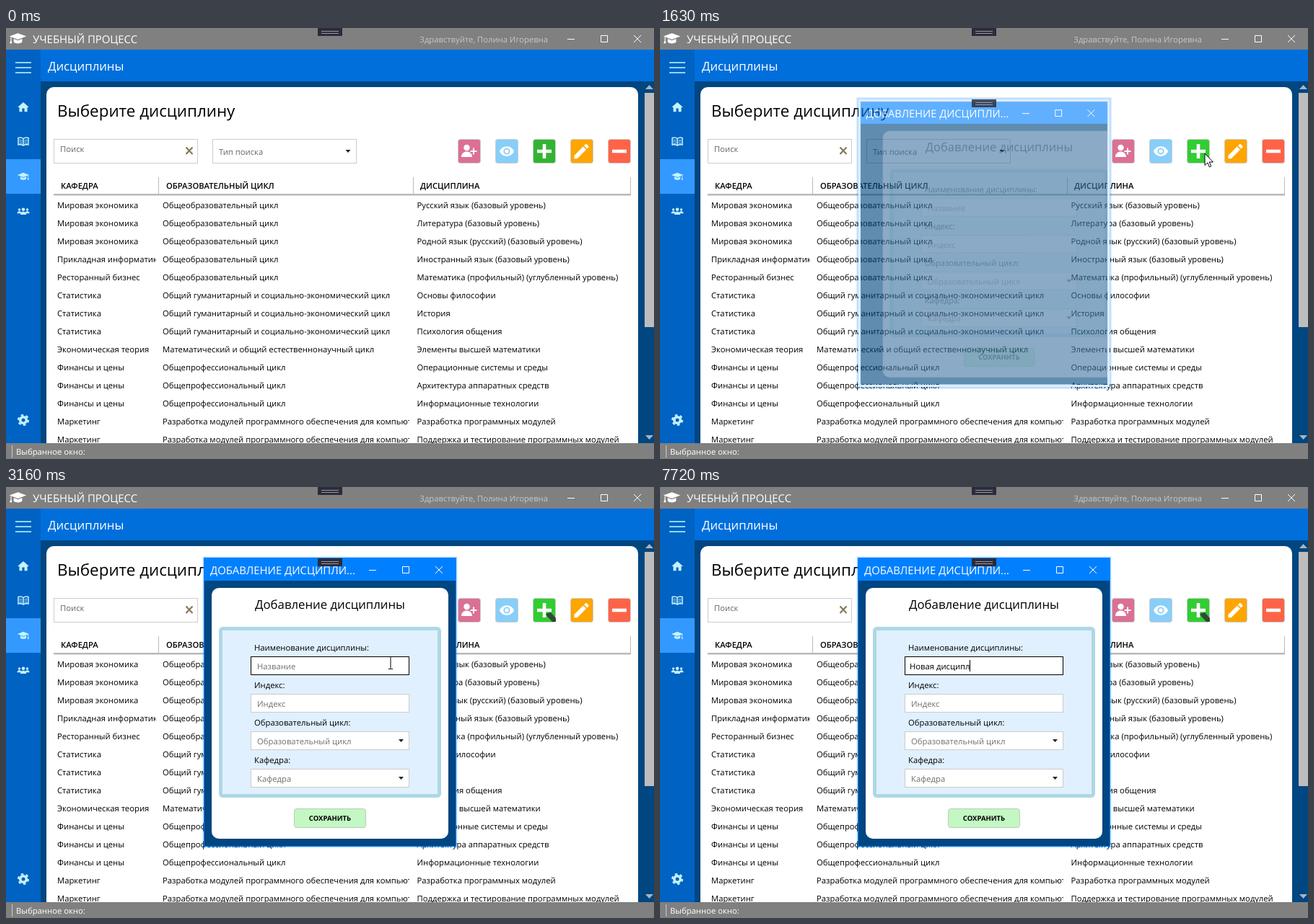
Animation of 898x598 px, one loop 8 s. Source, as an HTML page:

```html
<!DOCTYPE html>
<html lang="ru">
<head>
<meta charset="utf-8">
<title>Учебный процесс</title>
<style>
html, body { margin: 0; width: 100%; height: 100%; overflow: hidden; background: #004680; }
svg { display: block; }
text { font-family: "Open Sans", "Noto Sans", sans-serif; text-rendering: geometricPrecision; white-space: pre; }
</style>
</head>
<body>
<svg id="stage" width="898" height="598" viewBox="0 0 898 598" xmlns="http://www.w3.org/2000/svg"></svg>
<script>
const LOOP = 8000;
const GREY = '#808080', BLUE = '#0080ff', NAVY = '#004680', ICON = '#c4f3ff';

const attrs = o => Object.entries(o).map(([k, v]) => ` ${k}="${v}"`).join('');
const rect = (x, y, w, h, fill, o = {}) =>
  `<rect x="${x}" y="${y}" width="${w}" height="${h}" fill="${fill}"${attrs(o)}/>`;
const path = (d, fill, o = {}) => `<path d="${d}" fill="${fill}"${attrs(o)}/>`;
const line = (d, stroke, width = 1, o = {}) => path(d, 'none', { stroke, 'stroke-width': width, ...o });
const text = (x, y, s, { size = 11.27, weight = 400, fill = '#000', ...o } = {}) =>
  `<text x="${x}" y="${y}" fill="${fill}" style="font-size:${size}px;font-weight:${weight}"${attrs(o)}>${s}</text>`;
const group = (inner, o = {}) => `<g${attrs(o)}>${inner}</g>`;
// 24-unit icon centred on a point; a negative flip mirrors it
const icon = (x, y, size, inner, flip = 1) =>
  group(inner, { transform: `translate(${x} ${y}) scale(${flip * size / 24} ${size / 24}) translate(-12 -12)` });
const box = (x, y, w, h, o = {}) => rect(x + .5, y + .5, w - 1, h - 1, '#fff', { stroke: '#ccc', ...o });
const arrow = (x, y) => path(`M${x - 3.5} ${y - 2}h7l-3.5 4z`, '#222');
const handle = (y, id) => group(rect(432, y, 34, 11, '#2b2b3a') +
  line(`M437 ${y + 4.5}h24M437 ${y + 7.5}h24`, '#9a9aa2'), { id });
const winButtons = (x, y) =>
  line(`M${x} ${y + .5}h10M${x + 46.5} ${y - 4.5}h9v9h-9zM${x + 92} ${y - 5}l10 10m0 -10l-10 10`, '#fff');

const CAP = 'M12 4.500L24 9 12 13.500 0 9zM6 12.500v4.600c2.600 2.600 9.400 2.600 12 0v-4.600l-6 2.300z' +
  'M1.700 10v5l-1.400 4h3.400l-.8-4v-4.500z';
const HOME = 'M10 20v-6h4v6h5v-8h3L12 3 2 12h3v8z';
const PENCIL = 'M3 17.25V21h3.75L17.8 9.94l-3.75-3.75zM20.7 7a1 1 0 0 0 0-1.4l-2.3-2.3a1 1 0 0 0-1.4 0l-1.9 1.8 3.75 3.75z';
const EYE = 'M12 4.5C7 4.5 2.7 7.6 1 12c1.7 4.4 6 7.5 11 7.5s9.3-3.1 11-7.5c-1.7-4.4-6-7.5-11-7.5z' +
  'M12 17a5 5 0 1 1 0-10 5 5 0 0 1 0 10zM12 9a3 3 0 1 0 0 6 3 3 0 0 0 0-6z';

const person = (x, y, r) =>
  `<circle cx="${x}" cy="${y}" r="${r}"/><path d="M${x - r * 1.8} ${y + r * 3.1}c0 ${-r * 2.4} ${r * 3.6} ${-r * 2.4} ${r * 3.6} 0z"/>`;

function sidebar() {
  return rect(0, 30, 48, 546, '#0062c2') + rect(0, 182, 48, 48, '#3399ff') +
    line('M13 48h22M13 55h22M13 62h22', '#8fd6ff', 2) +
    icon(24, 110, 19, path(HOME, ICON)) +
    line('M24 153.5c-2-1.6-5-1.6-7-1v9.6c2-.6 5-.6 7 1c2-1.6 5-1.6 7-1v-9.6c-2-.6-5-.6-7 1v9.6', ICON, 1.5) +
    line('M18.5 155.5q2-.3 4 .5m-4 2q2-.3 4 .5m-4 2q2-.3 4 .5M25.5 156q2-.8 4-.5m-4 3q2-.8 4-.5m-4 3q2-.8 4-.5', ICON) +
    icon(24, 206, 16.5, path(CAP, ICON), -1) +
    group(person(18.5, 252, 1.7) + person(29.5, 252, 1.7) + person(24, 251.8, 2.3), { fill: ICON }) +
    `<circle cx="24" cy="544" r="4.3" fill="none" stroke="${ICON}" stroke-width="3.6"/>` +
    `<circle cx="24" cy="544" r="6.9" fill="none" stroke="${ICON}" stroke-width="2.4" stroke-dasharray="3.6 3.625"/>`;
}

function table() {
  const M = 'Мировая экономика', S = 'Статистика', F = 'Финансы и цены', K = 'Маркетинг';
  const O = 'Общеобразовательный цикл', P = 'Общепрофессиональный цикл',
    H = 'Общий гуманитарный и социально-экономический цикл',
    R = 'Разработка модулей программного обеспечения для компьютерных систем';
  const rows = [
    [M, O, 'Русский язык (базовый уровень)'],
    [M, O, 'Литература (базовый уровень)'],
    [M, O, 'Родной язык (русский) (базовый уровень)'],
    ['Прикладная информатика', O, 'Иностранный язык (базовый уровень)'],
    ['Ресторанный бизнес', O, 'Математика (профильный) (углубленный уровень)'],
    [S, H, 'Основы философии'],
    [S, H, 'История'],
    [S, H, 'Психология общения'],
    ['Экономическая теория', 'Математический и общий естественнонаучный цикл', 'Элементы высшей математики'],
    [F, P, 'Операционные системы и среды'],
    [F, P, 'Архитектура аппаратных средств'],
    [F, P, 'Информационные технологии'],
    [K, R, 'Разработка программных модулей'],
    [K, R, 'Поддержка и тестирование программных модулей']
  ];
  const cols = [[71, 76, 'КАФЕДРА', 207.5], [217, 222, 'ОБРАЗОВАТЕЛЬНЫЙ ЦИКЛ', 559], [569.5, 574, 'ДИСЦИПЛИНА', 866]];
  return cols.map(([x, hx, title, end], c) =>
    `<clipPath id="col${c}">${rect(x - 2, 233, end - x + 2, 343, '#000')}</clipPath>` +
    text(hx, 223, title, { size: 11.2, weight: 600 }) +
    group(rows.map((r, i) => text(x, 250 + 25 * i, r[c])).join(''), { 'clip-path': `url(#col${c})` })
  ).join('') +
    line('M211.5 207v24M564.5 207v24M865.5 207v24', '#bbb') + rect(66, 230, 800, 2.5, '#b9b9b9');
}

function toolbar() {
  const tints = ['#db7093', '#87cefa', '#32b432', '#ffa500', '#ff6347'];
  return tints.map((c, i) =>
    rect(626.5 + 52 * i, 154.5, 31, 33, c, { rx: 3, stroke: '#ccc', id: 'tool' + i })).join('') +
    group(person(638.5, 166, 4.2), { fill: '#fff' }) + line('M643.5 171h9M648 166.5v9', '#fff', 2) +
    icon(694, 171, 22, path(EYE, '#fff', { 'fill-rule': 'evenodd' })) +
    path('M747 176l8-2 7 8v5h-5z', '#2f4a35', { id: 'corner' }) +
    line('M736 171h20M746 161v20', '#fff', 4.6) +
    icon(797.5, 171, 27, path(PENCIL, '#fff')) +
    line('M840 171h20', '#fff', 4.6);
}

function page() {
  return rect(0, 0, 898, 598, NAVY) + rect(48, 30, 850, 44, '#006fdc') + sidebar() +
    text(58, 59, 'Дисциплины', { size: 16.8, fill: '#fff' }) +
    rect(56, 82, 820, 520, '#fff', { rx: 10 }) +
    text(71, 123, 'Выберите дисциплину', { size: 22.4 }) +
    box(66, 154, 200, 34) + text(75, 172, 'Поиск', { fill: '#666' }) +
    line('M249.5 165.5l9 9.5m0 -9.5l-9 9.5', '#857a58', 2.2) +
    box(286, 154, 200, 34) + text(295, 176, 'Тип поиска', { fill: '#666' }) + arrow(474, 171) +
    toolbar() + table() +
    rect(885, 90, 13, 325, '#bdbdbd') +
    path('M886 85h11l-5.5-6zM886 565h11l-5.5 6z', '#a9b4c2') +
    rect(0, 0, 898, 30, GREY, { id: 'top' }) + rect(0, 576, 898, 22, GREY, { id: 'status' }) +
    icon(16.5, 14.5, 23.5, path(CAP, '#fff')) +
    text(37, 21, 'УЧЕБНЫЙ ПРОЦЕСС', { size: 14.9, fill: '#fff' }) +
    text(751, 20, 'Здравствуйте, Полина Игоревна', { fill: '#fff', 'fill-opacity': .55, 'text-anchor': 'end' }) +
    winButtons(778, 15) + handle(0, 'grip') +
    line('M8.5 579v17', '#ccc') + text(14, 592, 'Выбранное окно:', { fill: '#fff' });
}

function dialog() {
  const labels = ['Наименование дисциплины:', 'Индекс:', 'Образовательный цикл:', 'Кафедра:'];
  const hints = ['Название', 'Индекс', 'Образовательный цикл', 'Кафедра'];
  const fields = labels.map((s, i) => {
    const y = 235 + 52 * i;
    return text(344, y - 8, s) + box(339, y, 220, 26, { id: 'field' + i }) +
      text(348, y + 18, hints[i], { fill: '#707070', id: 'hint' + i }) + (i > 1 ? arrow(547.5, y + 13) : '');
  }).join('');
  const form = rect(285, 140, 328, 348, '#fff', { rx: 10 }) +
    text(449, 169, 'Добавление дисциплины', { size: 16.8, 'text-anchor': 'middle' }) +
    rect(297.5, 196.5, 303, 232, '#e0f0ff', { rx: 3, stroke: '#add8e6', 'stroke-width': 5 }) + fields +
    text(346, 253, '', { id: 'typed' }) + rect(346, 240, 1, 16, '#000', { id: 'caret' }) +
    rect(399.5, 446.5, 99, 26, '#c3f7c3', { rx: 3, stroke: '#b9cdb9' }) +
    text(449, 463, 'СОХРАНИТЬ', { size: 9.5, weight: 700, 'text-anchor': 'middle' });
  const win = rect(275, 99, 348, 399, NAVY) + rect(275, 99, 348, 31, BLUE) +
    text(283, 121, 'ДОБАВЛЕНИЕ ДИСЦИПЛИ...', { size: 14.9, fill: '#fff' }) + winButtons(503, 115) +
    `<clipPath id="body">${rect(275, 130, 348, 368, '#000')}</clipPath>` +
    group(group(form, { id: 'form' }), { 'clip-path': 'url(#body)' });
  return group(
    rect(274.5, 98.5, 349, 400, 'none', { stroke: BLUE, 'stroke-width': 4, 'stroke-opacity': .25 }) +
    rect(276.5, 100.5, 345, 396, 'none', { stroke: '#dcedff', 'stroke-width': 3, id: 'halo' }) +
    group(win, { id: 'win' }) +
    rect(274.5, 98.5, 349, 400, 'none', { stroke: BLUE, id: 'edge' }) + handle(99, 'tab'), { id: 'dialog' });
}

const cursors =
  path('M0 0v16.5l3.8-3.6 2.6 6 2.4-1-2.6-5.9h5.3z', '#fff', { stroke: '#000', id: 'pointer' }) +
  line('M-3 -8.5h2.5l.5.5l.5-.5h2.5M0 -8v16M-3 8.5h2.5l.5-.5l.5.5h2.5', '#000', 1, { id: 'beam' });

document.getElementById('stage').innerHTML = page() + dialog() + cursors;

const el = id => document.getElementById(id);
const set = (id, o) => { for (const k in o) el(id).setAttribute(k, o[k]); };
const show = (id, on) => set(id, { visibility: on ? 'visible' : 'hidden' });
const clamp = v => Math.max(0, Math.min(1, v));

// time, x, y
const route = [[550, 890, 320], [900, 806, 220], [1290, 755, 174], [1740, 755, 174], [1850, 745, 175],
  [2200, 562, 238], [2370, 533, 240], [2530, 533, 240], [2770, 533, 244]];
const typing = [[3380, 'Y'], [3660, 'Yj'], [3880, 'Y'], [4050, ''], [4450, 'Н'], [4730, 'Но'], [4840, 'Нов'],
  [5170, 'Нова'], [5330, 'Новая'], [5390, 'Новаяд'], [5830, 'Новая'], [6050, 'Новая '], [6220, 'Новая д'],
  [6330, 'Новая ди'], [6550, 'Новая дис'], [6770, 'Новая дисц'], [6940, 'Новая дисциш'], [7330, 'Новая дисци'],
  [7610, 'Новая дисцип'], [7720, 'Новая дисципл']];

function locate(t) {
  let i = 0;
  while (i < route.length - 2 && t >= route[i + 1][0]) i++;
  const [t0, x0, y0] = route[i], [t1, x1, y1] = route[i + 1];
  const p = clamp((t - t0) / (t1 - t0));
  return `translate(${x0 + (x1 - x0) * p} ${y0 + (y1 - y0) * p})`;
}

let shown = null;
function type(t) {
  let s = '';
  for (const [at, value] of typing) if (t >= at) s = value;
  if (s !== shown) {
    shown = s;
    el('typed').textContent = s;
    set('caret', { x: 346 + Math.floor(s ? el('typed').getComputedTextLength() : 0) });
  }
  show('hint0', !s);
  show('caret', t >= 2590 && !(t >= 3160 && t < 3380));
}

function draw(now) {
  const t = now % LOOP;
  const step = 170 / 3;
  const m = t < 550 ? t : 550 + Math.floor((t - 542) / step) * step;

  const bar = t >= 1290 && t < 1570 ? BLUE : GREY;
  set('top', { fill: bar });
  set('status', { fill: bar });
  set('tool2', { fill: t < 1230 ? '#32b432' : t < 1570 ? '#dddddd' : '#32cd32' });
  show('corner', t >= 1790);

  const open = t >= 1570;
  set('dialog', { display: open ? 'inline' : 'none' });
  const e = 1 - (1 - clamp((m - 1550) / 200)) ** 2;
  const p = clamp((m - 1515) / 420);
  set('win', {
    opacity: e,
    transform: `translate(449 298.5) scale(${1 - .045 * (1 - e)}) translate(-449 -298.5)`
  });
  set('edge', { opacity: e < 1 ? 0 : 1 });
  set('halo', { opacity: e < 1 ? 1 : 0 });
  set('tab', { opacity: .5 + e / 2 });
  set('form', { opacity: p, transform: `translate(${30 * (1 - p) ** 1.1} 0)` });
  const tone = Math.round(204 * (1 - clamp((m - 2500) / 240)));
  set('field0', { stroke: `rgb(${tone},${tone},${tone})` });

  const beam = t >= 2340;
  show('pointer', t >= 550 && !beam);
  show('beam', beam && t < 3380);
  const spot = locate(m);
  set('pointer', { transform: spot });
  set('beam', { transform: spot });
  type(t);
}

function tick() {
  draw(performance.now());
  requestAnimationFrame(tick);
}
tick();
</script>
</body>
</html>
```
